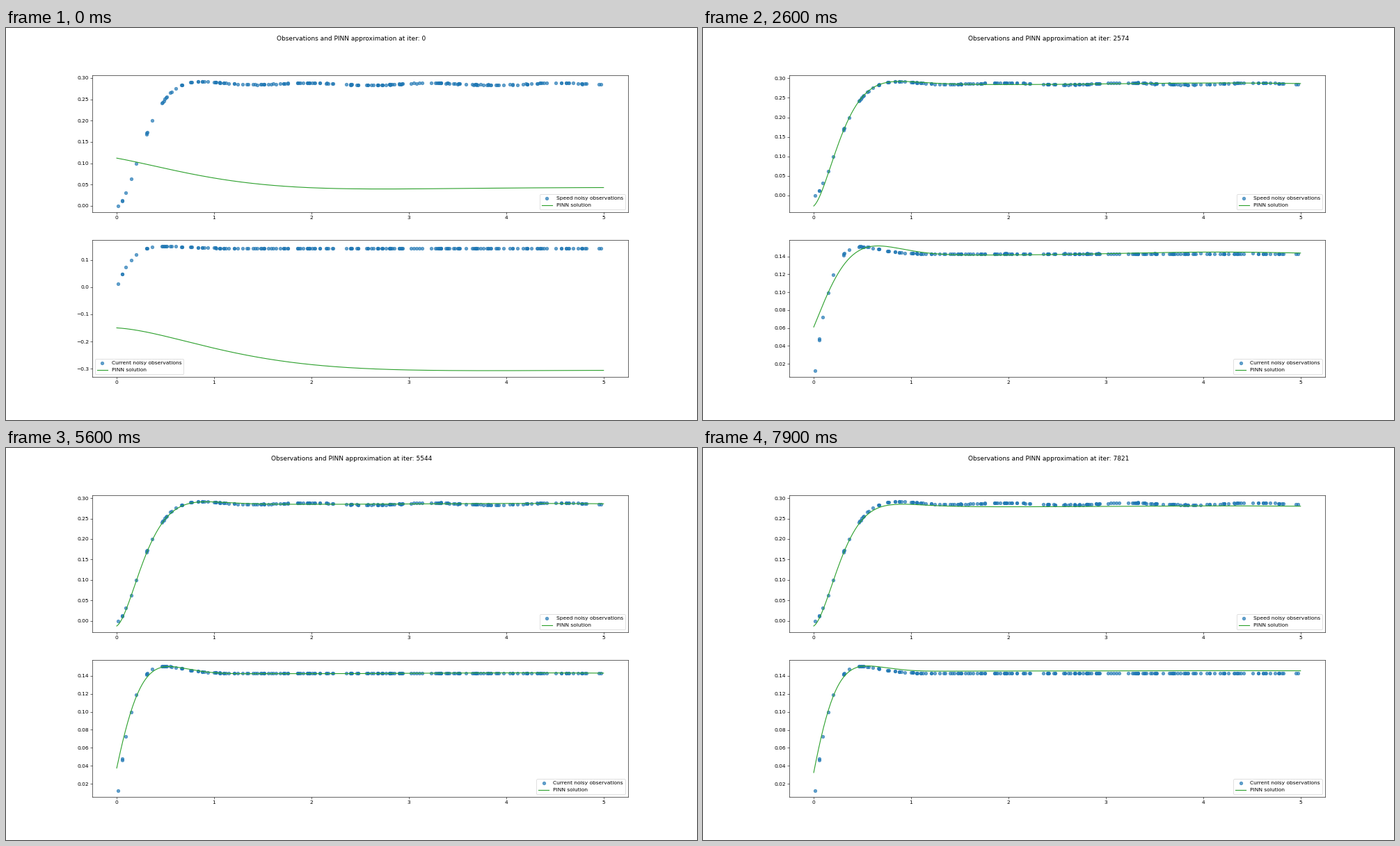
A matplotlib script that plays this animation: 993x564 px, repeating every 8 s.

```python
import numpy as np
import matplotlib.pyplot as plt
from matplotlib.animation import FuncAnimation

W, H, DPI = 993, 564, 993 / 18.48
FRAMES, INTERVAL, STEP = 80, 100, 99


def response(t, level, start, decay, freq, lag):
    """Damped step response running from start to level."""
    swing = np.cos(freq * t) + lag * np.sin(freq * t)
    return level - (level - start) * np.exp(-decay * t) * swing


def ramp(x):
    u = np.clip(x, 0, 1)
    return u * u * (3 - 2 * u)


# Noisy observations of a motor's step response
rng = np.random.default_rng(3)
obs_t = np.r_[0.0136, np.sort(rng.uniform(0.05, 4.95, 198)), 4.97]
obs_speed = (response(obs_t, 0.286, 0.001, 4.4, 3.4, 1.25)
             + 0.0024 * np.cos(2 * np.pi * (obs_t - 1.95) / 1.28)
             + rng.normal(0, 0.0004, obs_t.size))
obs_current = (response(obs_t, 0.143, 0, 5.1, 3.8, -0.395)
               + rng.normal(0, 0.0001, obs_t.size))

# Key stages of the fit: second -> level, start, decay, freq, lag, ripple
SPEED_FIT = {
    0.0: (0.043, 0.112, 1.0, 1.0, 0.40, 0),
    1.0: (0.286, -0.005, 2.9, 2.4, 0.46, 0.006),
    1.9: (0.286, -0.0304, 4.3, 3.4, 1.05, 0.0022),
    5.6: (0.286, -0.0126, 4.3, 3.3, 1.15, 0.001),
}
CURRENT_FIT = {
    0.0: (-0.305, -0.150, 1.1, 0.8, 1.20, 0),
    1.0: (0.1443, 0.080, 2.1, 2.6, 0.28, 0.0015),
    1.9: (0.1435, 0.0658, 2.7, 3.3, 0.0, 0.0018),
    3.4: (0.143, 0.0557, 3.6, 4.0, -0.05, 0.0013),
    6.2: (0.1428, 0.0325, 4.5, 4.2, -0.13, 0.0002),
}
t = np.linspace(0, 5, 400)


def fit_at(sec, stages, drift):
    """Fitted curve at a given second, with a late drift off the plateau."""
    eased = 1 - (1 - sec) ** 3 if sec < 1 else sec
    *shape, ripple = [np.interp(eased, list(stages), col)
                      for col in zip(*stages.values())]
    shift = 1 + 0.9 * max(0, 1.9 - sec)
    wave = -ripple * ramp(t) * np.sin(2 * np.pi * (t - shift) / 4.2)
    late = drift * ramp((sec - 7.2) / 0.7) * ramp((t - 0.3) / 0.6)
    return response(t, *shape) + wave + late


fig, axes = plt.subplots(2, 1, dpi=DPI,
                         figsize=((W + 1e-4) / DPI, (H + 1e-4) / DPI))
title = fig.suptitle("")


def make_panel(ax, name, obs, stages, drift):
    ax.scatter(obs_t, obs, color="tab:blue", alpha=0.7,
               label=f"{name} noisy observations")
    line, = ax.plot(t, fit_at(0, stages, drift), color="tab:green",
                    label="PINN solution")
    ax.set_xlim(-0.25, 5.25)
    ax.legend(loc="best")
    return ax, line, obs, stages, drift


panels = [make_panel(axes[0], "Speed", obs_speed, SPEED_FIT, -0.006),
          make_panel(axes[1], "Current", obs_current, CURRENT_FIT, 0.0028)]


def update(n):
    title.set_text(f"Observations and PINN approximation at iter: {n * STEP}")
    for ax, line, obs, stages, drift in panels:
        y = fit_at(n * INTERVAL / 1000, stages, drift)
        line.set_ydata(y)
        lo, hi = min(obs.min(), y.min()), max(obs.max(), y.max())
        pad = 0.05 * (hi - lo)
        ax.set_ylim(lo - pad, hi + pad)
    return [title] + [p[1] for p in panels]


anim = FuncAnimation(fig, update, frames=FRAMES, interval=INTERVAL,
                     repeat=True, repeat_delay=0, blit=False)
plt.show()
```
